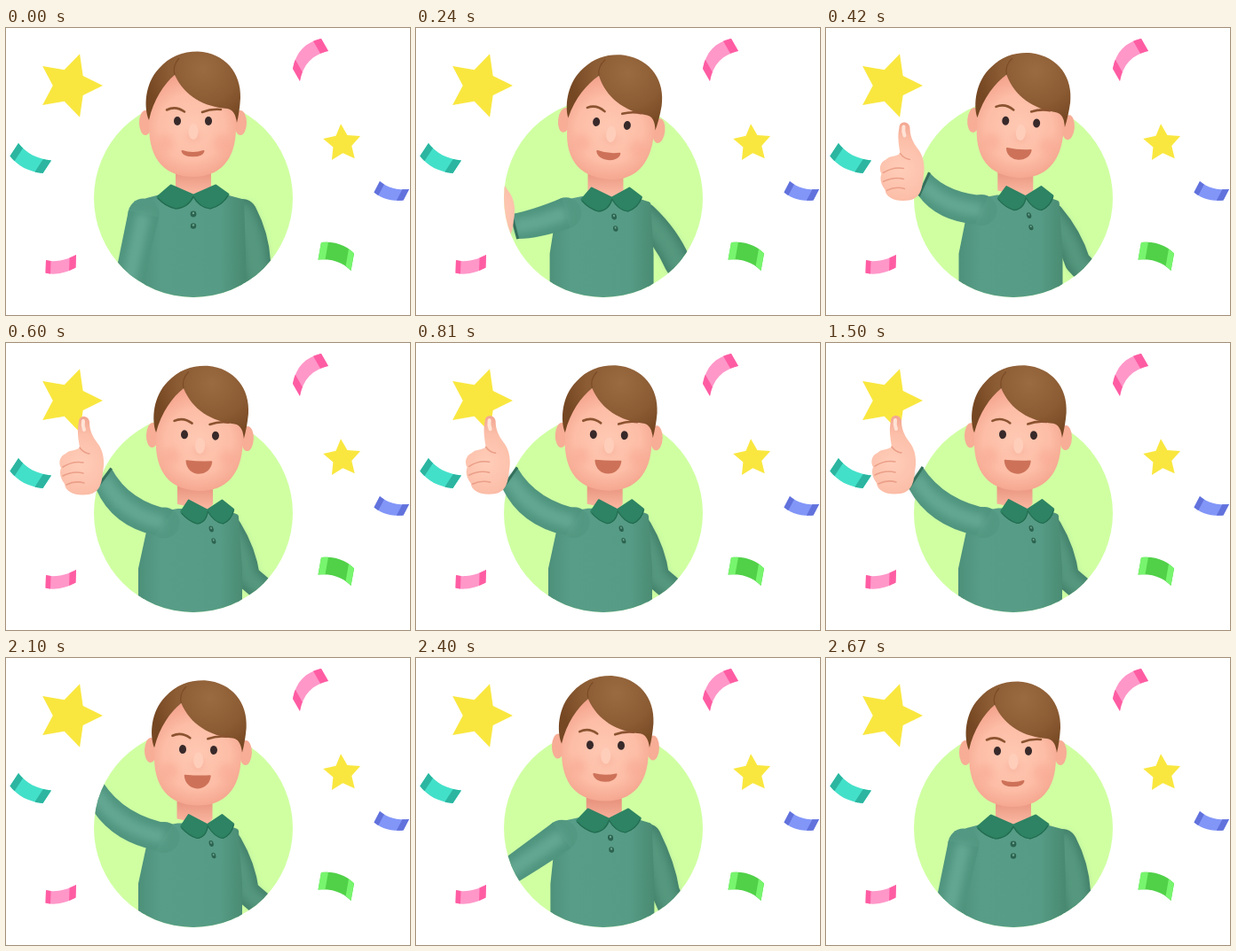
These frames come from a looping animation (455 px wide and 324 px high, 2.7 s). An HTML page:

```html
<!DOCTYPE html>
<html lang="en">
<head>
<meta charset="utf-8">
<title>Thumbs up</title>
<style>
html, body { margin: 0; width: 100%; height: 100%; overflow: hidden; background: #fff; }
svg { display: block; width: 100vw; height: 100vh; }
</style>
</head>
<body>
<svg viewBox="0 0 455 324" xmlns="http://www.w3.org/2000/svg">
  <defs>
    <clipPath id="disc"><circle cx="211" cy="192" r="112"/></clipPath>
    <filter id="soft" filterUnits="userSpaceOnUse" x="0" y="0" width="455" height="400"><feGaussianBlur stdDeviation="4"/></filter>
    <linearGradient id="knit" gradientUnits="userSpaceOnUse" x1="150" y1="0" x2="272" y2="0">
      <stop offset="0" stop-color="#4d917b"/><stop offset=".2" stop-color="#589d88"/>
      <stop offset=".75" stop-color="#569b85"/><stop offset="1" stop-color="#47886f"/>
    </linearGradient>
    <radialGradient id="skin" gradientUnits="userSpaceOnUse" cx="209" cy="112" r="62">
      <stop offset="0" stop-color="#ffc9b3"/><stop offset=".6" stop-color="#fdbda6"/><stop offset="1" stop-color="#f3a18b"/>
    </radialGradient>
    <linearGradient id="neckTone" gradientUnits="userSpaceOnUse" x1="0" y1="162" x2="0" y2="188">
      <stop offset="0" stop-color="#e99580"/><stop offset="1" stop-color="#fbb9a2"/>
    </linearGradient>
    <radialGradient id="hairTone" gradientUnits="userSpaceOnUse" cx="222" cy="46" r="66">
      <stop offset="0" stop-color="#9a6a40"/><stop offset=".6" stop-color="#8b5b33"/><stop offset="1" stop-color="#754722"/>
    </radialGradient>
    <radialGradient id="handTone" gradientUnits="userSpaceOnUse" cx="75" cy="135" r="54">
      <stop offset="0" stop-color="#ffcdb9"/><stop offset=".6" stop-color="#fcbfa9"/><stop offset="1" stop-color="#f2a590"/>
    </radialGradient>
  </defs>

  <circle cx="211" cy="192" r="112" fill="#d0ffa2"/>
  <g id="confetti"></g>

  <g clip-path="url(#disc)" stroke-linejoin="round">
    <g id="sideArm" fill="none" stroke-linecap="round">
      <path stroke="#43816b"/>
      <path stroke="#55987f" filter="url(#soft)"/>
    </g>
    <path id="torso" fill="url(#knit)" stroke="url(#knit)" stroke-width="6"/>
  </g>

  <g id="reach">
    <circle id="shoulder" r="17.500" fill="#539882"/>
    <path id="sleeve" fill="#4f947e"/>
    <path id="sleeveLight" fill="none" stroke="#64a793" stroke-width="16" filter="url(#soft)"/>
    <path id="cuff" stroke="#35705c" stroke-width="3"/>
    <g id="hand">
      <path fill="url(#handTone)" d="M73 88C73 80 84 80 85 88C85 97 88 104 94 112C102 122 102 135 100 145C99 158 96 168 84 170C70 172 58 168 57 158C52 152 51 145 53 140C49 133 53 126 58 124C63 119 70 121 74 117C72 105 71 98 73 88Z"/>
      <path fill="none" stroke="#eb9f88" stroke-width="1.500" stroke-linecap="round" d="M74 117Q78 123 85 124M55 139Q66 132 78 134M55 149Q67 143 78 146M59 159Q69 154 79 157"/>
      <path fill="none" stroke="#ffe3d6" stroke-width="4" stroke-linecap="round" d="M78 87Q77 92 79 97"/>
    </g>
  </g>

  <g clip-path="url(#disc)" stroke-linejoin="round">
    <path id="neck" fill="url(#neckTone)"/>
    <g id="collar">
      <path fill="#2d8363" stroke="#2d8363" stroke-width="3" d="M-25-11L-40 2Q-32 11-20 14Q-6 13 0 0ZM25-11L39-1Q33 10 19 14Q7 13 0 0Z"/>
      <path fill="none" stroke="#236b50" stroke-width="1.200" d="M-40 3Q-32 12-20 15Q-6 14 0 1Q7 14 19 15Q33 11 39 0"/>
      <g fill="#2c6350"><circle cy="21" r="3.400"/><circle cy="34.500" r="3.200"/></g>
      <g fill="#6aa78f"><circle cy="20" r="1.200"/><circle cy="33.500" r="1.200"/></g>
    </g>
  </g>

  <g id="head">
    <g fill="#f7ad96"><ellipse cx="157" cy="107" rx="7" ry="14"/><ellipse cx="264" cy="107" rx="7" ry="14"/></g>
    <path fill="url(#skin)" d="M161 110C161 70 185 48 211 48C240 48 259 75 259 112C259 150 240 168 211 168C180 168 161 150 161 110Z"/>
    <g fill="#f69c88" opacity=".35" filter="url(#soft)"><circle cx="179" cy="130" r="10"/><circle cx="243" cy="130" r="10"/></g>
    <ellipse cx="211" cy="122" rx="8" ry="6" fill="#ef9983" opacity=".4" filter="url(#soft)"/>
    <ellipse cx="211" cy="117" rx="5.500" ry="9" fill="#ffcebb"/>
    <path fill="url(#hairTone)" d="M161 104C155 90 156 63 172 46C184 32 199 26.500 216 26.500C247 28 265 51 264 79Q263 95 260 107Q258 92 249 91C223 89 201 77 190 53C178 63 166 81 161 104Z"/>
    <path fill="none" stroke="#7b4c27" stroke-width="1.200" d="M190 53Q187 43 195 34"/>
    <g fill="#38292a"><ellipse cx="193" cy="105" rx="4" ry="5"/><ellipse cx="228" cy="105" rx="4" ry="5"/></g>
    <path id="brows" fill="none" stroke="#8b5330" stroke-width="2.600" stroke-linecap="round" d="M181 92.500Q191 87.500 201 94.500M221 95Q231 91 242 92"/>
    <path id="mouth" fill="#cd7259" stroke="#cd7259" stroke-width="2" stroke-linejoin="round"/>
  </g>
</svg>
<script>
const LOOP = 2700, STEP = 30;
const UNMASK = 330, MASK = 2100;   // the raised arm leaves the disc between these
const el = id => document.getElementById(id);
const set = (node, attrs) => { for (const k in attrs) node.setAttribute(k, attrs[k]); };

function star(cx, cy, r, turn) {
  const pts = [];
  for (let i = 0; i < 10; i++) {
    const a = (turn + i * 36) * Math.PI / 180, d = i % 2 ? r * 0.5 : r;
    pts.push([cx + d * Math.cos(a), cy + d * Math.sin(a)]);
  }
  return `<polygon fill="#f9e73f" points="${pts.join(' ')}"/>`;
}

// A curve a-b-c swept by a shift, with darker or lighter ends
function ribbon(fill, ends, a, b, c, shift) {
  const at = t => [0, 1].map(i => a[i] * (1 - t) ** 2 + 2 * b[i] * t * (1 - t) + c[i] * t * t);
  const strip = (from, to, color) => {
    const edge = [];
    for (let i = 0; i <= 8; i++) edge.push(at(from + (to - from) * i / 8));
    const back = edge.map(p => [p[0] + shift[0], p[1] + shift[1]]).reverse();
    return `<polygon fill="${color}" points="${edge.concat(back).join(' ')}"/>`;
  };
  return strip(0, 1, fill) + strip(0, 0.18, ends) + strip(0.8, 1, ends);
}

el('confetti').innerHTML =
  star(71.5, 65, 37.5, 0) + star(378.6, 130.3, 22, -22) +
  ribbon('#ff97c9', '#ff5da3', [355, 12], [328, 18], [323, 46], [8, 14]) +
  ribbon('#43e0c9', '#2cb5a0', [14, 130], [27, 147], [51, 149.5], [-9.5, 14.5]) +
  ribbon('#8296f8', '#6272dc', [421, 173], [434, 184], [454, 182], [-6.5, 12.5]) +
  ribbon('#50d148', '#78f56e', [355, 242], [378, 240], [392, 254.5], [-3.5, 19.5]) +
  ribbon('#ff97c9', '#ff5da3', [45, 262], [60, 266], [79, 256], [-0.5, 14.5]);

// twist turns the chest, smile opens the mouth; everything else follows from these
const pose = (headX, headY, tilt, chest, twist, smile, wristX, wristY, elbow) =>
  ({ headX, headY, tilt, chest, twist, smile, wristX, wristY, elbow });
const idle = pose(0, 0, 0, 0, 0, 0, 128, 330, 281);
const wind = pose(10, 3, 6.5, 3, 0.6, 0.3, 111, 224, 294);
const rise = pose(8, -1, 2.2, 0, 1, 0.95, 110, 153, 272);
const up = pose(6, -1.5, 1.5, -0.5, 1, 1, 101, 152, 271);
const drop = pose(3, -6.5, 1, -7, 0.4, 0.3, 96, 247, 281);
const keys = [[0, idle], [240, wind], [600, rise], [1050, up], [2100, up], [2400, drop], [2640, idle], [2700, idle]];

// Monotone cubic between keys
function value(name, t) {
  let k = 0;
  while (k < keys.length - 2 && t >= keys[k + 1][0]) k++;
  const y = n => keys[n][1][name];
  const slope = n => (y(n + 1) - y(n)) / (keys[n + 1][0] - keys[n][0]);
  const tangent = n => {
    if (n === 0 || n === keys.length - 1) return 0;
    const a = slope(n - 1), b = slope(n);
    return a * b > 0 ? 2 * a * b / (a + b) : 0;
  };
  const h = keys[k + 1][0] - keys[k][0], u = (t - keys[k][0]) / h, v = 1 - u;
  return y(k) * (1 + 2 * u) * v * v + tangent(k) * h * u * v * v +
    y(k + 1) * u * u * (3 - 2 * u) - tangent(k + 1) * h * u * u * v;
}

function drawHead(p, nod) {
  set(el('head'), { transform: `translate(${p.headX} ${p.headY + nod}) rotate(${p.tilt} 210.5 105)` });
  set(el('brows'), { transform: `translate(0 ${-Math.min(2.5, 8 * p.smile)})` });
  const x = 210.5, y = 139 - 4.5 * p.smile, w = 12 + 2 * p.smile;
  const sag = 4 - 3 * p.smile, low = y + 7 + 11 * p.smile;
  set(el('mouth'), { d: `M${x - w} ${y}Q${x} ${y + sag} ${x + w} ${y}C${x + w * 0.85} ${low} ${x - w * 0.85} ${low} ${x - w} ${y}Z` });
}

function drawBody({ chest, twist, headX, elbow }) {
  const vx = 211 + 16 * twist, vy = 189 + chest, half = 53 - 6 * twist, slide = 4 * twist;
  set(el('torso'), { d: `M${vx - 33} ${vy + 1}L${212 - half} ${vy + 6}L${156 - slide} 255V310H${267 - slide}V255L${212 + half} ${vy + 7}L${vx + 32 - 16 * twist} ${vy + 1}Z` });
  set(el('collar'), { transform: `matrix(${1 - 0.25 * twist} 0 ${0.2 * twist} 1 ${vx} ${vy})` });
  const nx = 211 + 0.25 * headX;
  set(el('neck'), { d: `M${nx - 20} 145H${nx + 20}V${vy - 7}L${vx} ${vy}L${nx - 20} ${vy - 7}Z` });

  const sx = 266 - 14 * twist, width = 34 - 6 * twist;
  const d = `M${sx} ${210 + chest}Q${(sx + elbow) / 2 + 6} 236 ${elbow} 264L${elbow + 7 + 14 * twist} ${300 - 18 * twist}`;
  [...el('sideArm').children].forEach((path, i) => set(path, { d, 'stroke-width': width - 10 * i }));
}

// Tapered sleeve around a bent centre line
function drawArm({ chest, twist, wristX, wristY }) {
  const sx = 155 + 23 * twist, sy = 210 + chest - 7 * twist, sag = 15 * twist * twist;
  const bx = (sx + wristX) / 2 - sag, by = (sy + wristY) / 2 + sag;
  const len = Math.hypot(wristX - sx, wristY - sy);
  const nx = (sy - wristY) / len, ny = (wristX - sx) / len;
  const off = (x, y, r) => `${x + nx * r} ${y + ny * r}`;
  const a = off(wristX, wristY, 14.5), b = off(wristX, wristY, -14.5);
  set(el('shoulder'), { cx: sx, cy: sy });
  set(el('sleeve'), { d: `M${off(sx, sy, 17.5)}Q${off(bx, by, 16.5)} ${a}L${b}Q${off(bx, by, -16.5)} ${off(sx, sy, -17.5)}Z` });
  set(el('sleeveLight'), { d: `M${sx} ${sy}Q${bx} ${by} ${wristX} ${wristY}` });
  set(el('cuff'), { d: `M${a}L${b}` });
  set(el('hand'), { transform: `translate(${wristX - 101} ${wristY - 152})` });
}

function draw(t) {
  const p = {};
  for (const name in idle) p[name] = value(name, t);
  const nod = t > 1200 && t < 1530 ? 0.6 * Math.sin((t - 1200) / 330 * Math.PI) : 0;
  drawHead(p, nod);
  drawBody(p);
  drawArm(p);
  set(el('reach'), { 'clip-path': t >= UNMASK && t < MASK ? 'none' : 'url(#disc)' });
}

let start;
function tick(now) {
  if (start === undefined) start = now;
  draw(Math.floor((now - start) % LOOP / STEP) * STEP);
  requestAnimationFrame(tick);
}
draw(0);
requestAnimationFrame(tick);
</script>
</body>
</html>
```
